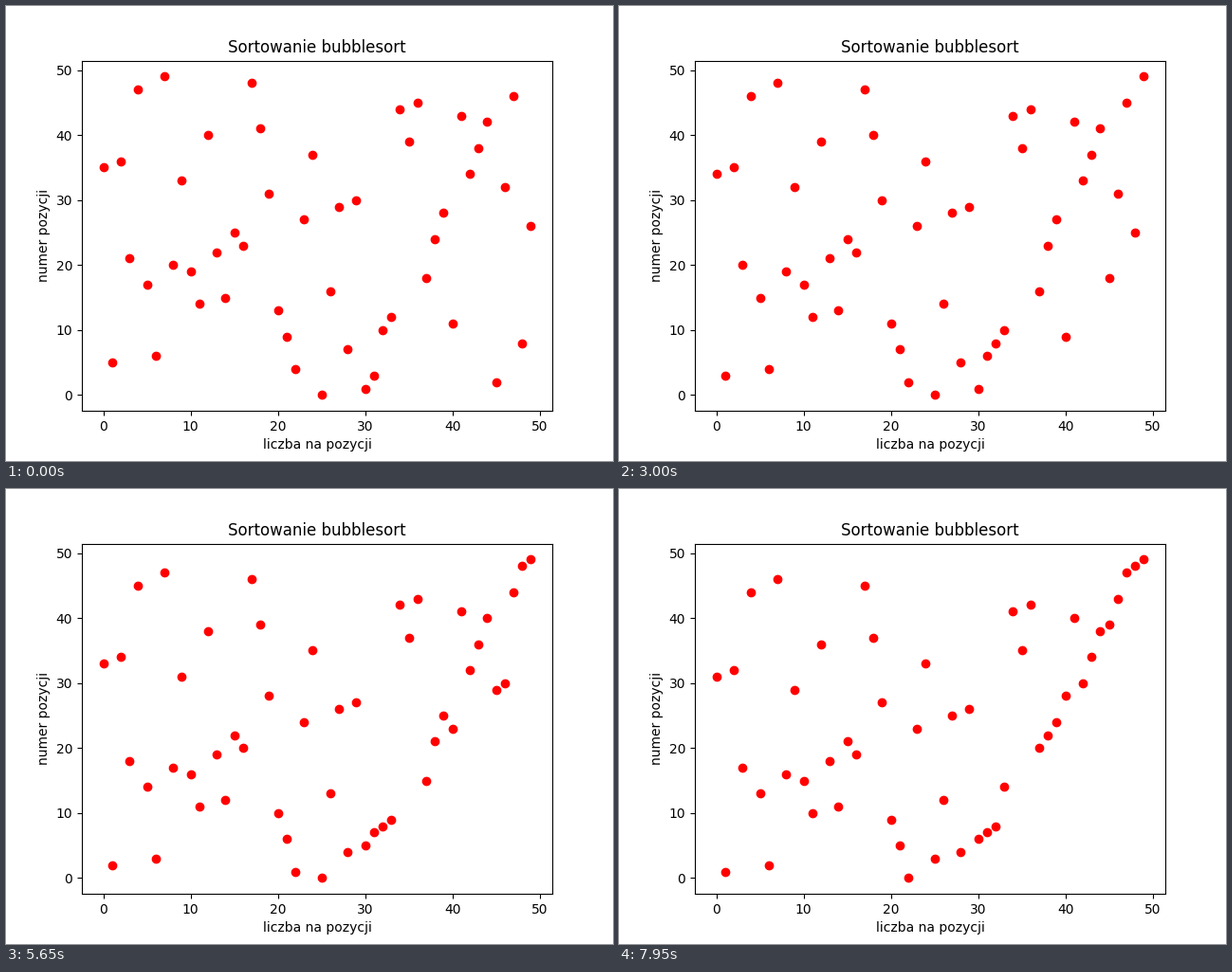
Animation of 640 by 480 pixels, one loop 8 s. Source, as a matplotlib script:

```python
import matplotlib.pyplot as plt
from matplotlib.animation import FuncAnimation

STEP_MS = 50
FRAMES = 160
START = [25, 30, 45, 31, 22, 1, 6, 28, 48, 21, 32, 40, 33, 20, 11, 14, 26,
         5, 37, 10, 8, 3, 13, 16, 38, 15, 49, 23, 39, 27, 29, 19, 46, 9, 42,
         0, 2, 24, 43, 35, 12, 18, 44, 41, 34, 36, 47, 4, 17, 7]


def bubble_states(values):
    """Yield the list at the start and after every swap."""
    a = list(values)
    yield a[:]
    for end in range(len(a) - 1, 0, -1):
        for j in range(end):
            if a[j] > a[j + 1]:
                a[j], a[j + 1] = a[j + 1], a[j]
                yield a[:]


states = [s for _, s in zip(range(FRAMES), bubble_states(START))]

fig, ax = plt.subplots(figsize=(6.4, 4.8), dpi=100)
dots, = ax.plot(START, range(len(START)), "ro")
ax.set_title("Sortowanie bubblesort")
ax.set_xlabel("liczba na pozycji")
ax.set_ylabel("numer pozycji")


def draw(frame):
    dots.set_xdata(states[frame])
    return dots,


anim = FuncAnimation(fig, draw, frames=FRAMES, interval=STEP_MS,
                     repeat=True, repeat_delay=0)
plt.show()
```
